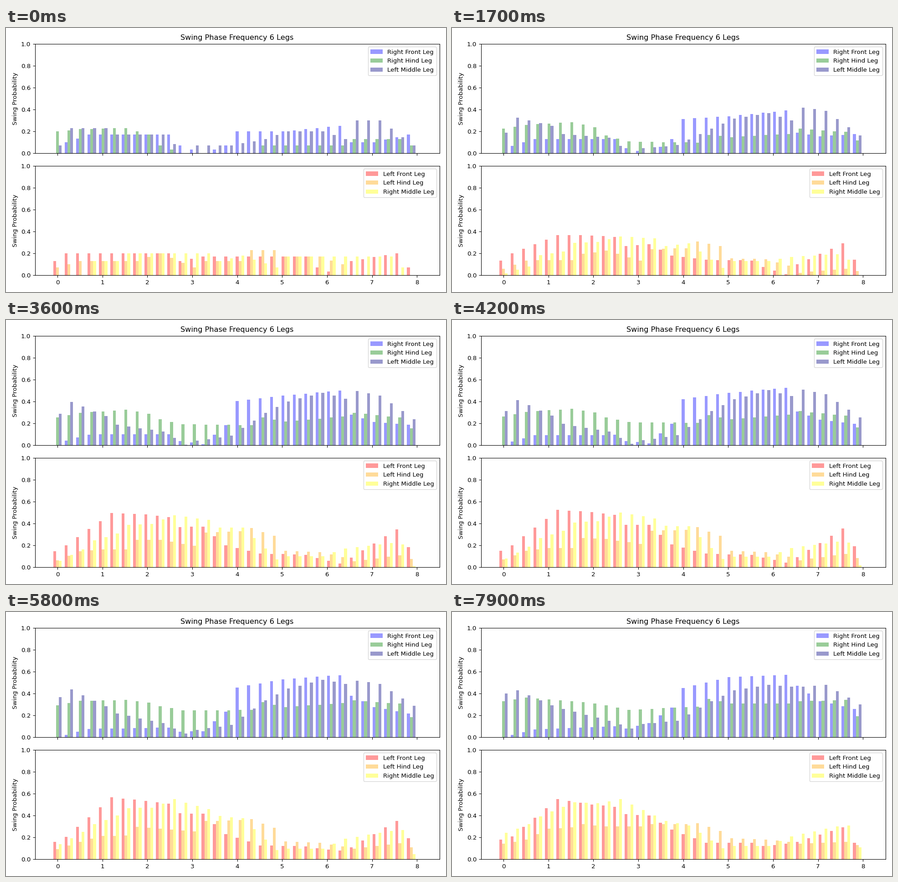
Recreate the animation shown at these times as a matplotlib script. Size 966 by 580 pixels, loop 8000 ms.

```python
import numpy as np
import matplotlib.pyplot as plt
from matplotlib.animation import FuncAnimation

plt.rcParams["font.family"] = "DejaVu Sans"

FRAMES, INTERVAL = 80, 100
POSE_STEPS = [0, 28, 79]
BARS = np.arange(32)
STEP = 8 / 31.5
WIDTH = STEP / 4

# 966 x 580 pixels
fig, (top, bottom) = plt.subplots(2, 1, sharex=True, figsize=(10, 6.00415), dpi=96.6)
legs = []


def add_leg(ax, slot, color, label, *keys):
    """Add one leg. Keys are (bar, early %, middle %, late %), joined by lines over
    the bars and by a parabola over time."""
    at, *poses = np.transpose(keys)
    poses = [np.interp(BARS, at, pose) / 100 for pose in poses]
    curve = np.polyfit(POSE_STEPS, poses, 2)
    rects = ax.bar(BARS * STEP + slot * WIDTH, poses[0], WIDTH,
                   color=color, alpha=0.4, label=label)
    legs.append((rects, curve))


add_leg(top, -1, "blue", "Right Front Leg",
        (0, 0, 0, 0), (1, 10, 5, 2), (3, 17, 11, 7), (10, 17, 11, 10), (11, 7, 4, 8),
        (13, 0, 0, 13), (15, 7, 16, 27), (16, 20, 37, 45), (20, 20, 41, 55),
        (25, 25, 46, 57), (26, 10, 24, 47), (28, 10, 19, 33), (31, 17, 18, 26))
add_leg(top, 0, "green", "Right Hind Leg",
        (0, 20, 24, 33), (2, 22, 28, 36), (6, 23, 31, 33), (8, 17, 27, 31), (9, 7, 21, 29),
        (11, 0, 16, 25), (17, 0, 15, 28), (18, 7, 22, 35), (20, 7, 19, 31),
        (25, 7, 23, 31), (26, 13, 27, 33), (30, 13, 23, 34), (31, 7, 14, 19))
add_leg(top, 1, "navy", "Left Middle Leg",
        (0, 7, 25, 40), (1, 23, 37, 43), (4, 23, 26, 29), (5, 17, 18, 26), (9, 17, 13, 15),
        (11, 0, 0, 8), (12, 7, 4, 12), (15, 7, 8, 15), (18, 13, 27, 33), (20, 20, 37, 43),
        (23, 20, 44, 48), (25, 13, 38, 46), (26, 30, 47, 46), (28, 30, 43, 48), (31, 7, 21, 30))
add_leg(bottom, -1, "red", "Left Front Leg",
        (0, 13, 14, 18), (1, 20, 20, 21), (5, 20, 45, 55), (8, 20, 44, 50), (10, 20, 42, 48),
        (11, 13, 33, 41), (13, 17, 34, 40), (15, 17, 19, 27), (18, 17, 13, 15),
        (22, 17, 12, 15), (23, 7, 8, 12), (25, 0, 2, 14), (26, 13, 9, 16),
        (30, 20, 33, 29), (31, 7, 17, 15))
add_leg(bottom, 0, "orange", "Left Hind Leg",
        (0, 7, 6, 14), (2, 13, 14, 18), (4, 13, 15, 28), (6, 13, 15, 29), (7, 13, 23, 32),
        (9, 20, 24, 30), (12, 7, 17, 30), (13, 13, 29, 32), (16, 13, 30, 32),
        (17, 23, 34, 33), (19, 23, 28, 26), (20, 17, 15, 19), (23, 17, 14, 18),
        (25, 10, 9, 16), (26, 0, 4, 14), (30, 0, 9, 16), (31, 0, 6, 13))
add_leg(bottom, 1, "yellow", "Right Middle Leg",
        (0, 0, 4, 24), (2, 0, 13, 32), (3, 13, 22, 39), (5, 13, 27, 48), (6, 20, 35, 52),
        (8, 20, 36, 51), (10, 20, 43, 55), (13, 20, 40, 40), (14, 13, 33, 35),
        (16, 18, 34, 31), (19, 7, 7, 10), (20, 17, 11, 12), (23, 17, 11, 12),
        (25, 17, 17, 21), (29, 17, 21, 30), (30, 7, 18, 31), (31, 0, 0, 11))

for ax in (top, bottom):
    ax.set_xlim(-0.5, 8.5)
    ax.set_ylim(0, 1)
    ax.set_ylabel("Swing Probability")
    ax.legend(loc="upper right")
top.set_title("Swing Phase Frequency 6 Legs")
fig.tight_layout()


def update(k):
    for rects, curve in legs:
        for rect, h in zip(rects, np.polyval(curve, k)):
            rect.set_height(max(h, 0))
    return [rect for rects, _ in legs for rect in rects]


anim = FuncAnimation(fig, update, frames=FRAMES, interval=INTERVAL, repeat=True, repeat_delay=0)
plt.show()
```
